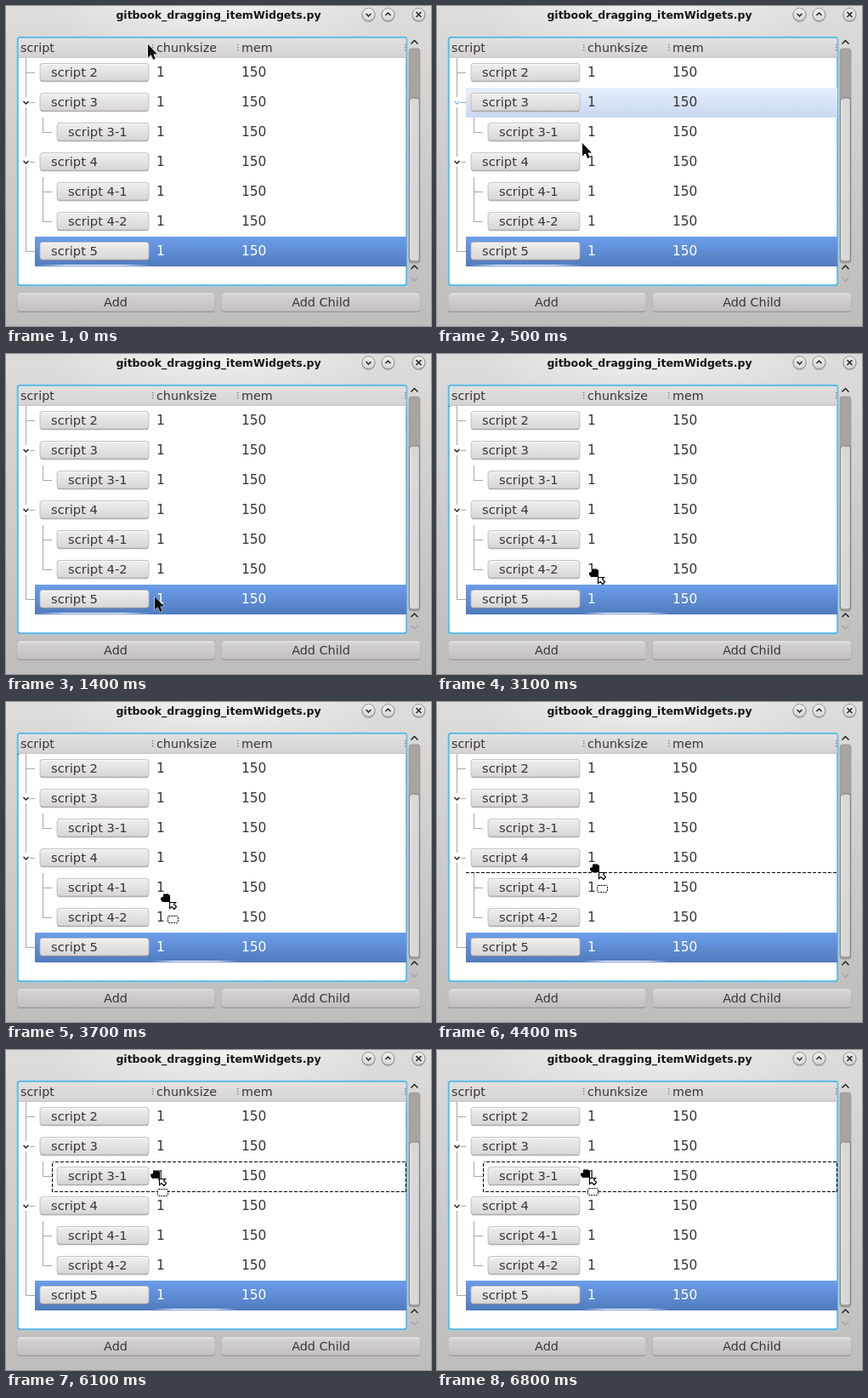
An HTML page that plays this animation: 500x376 px, repeating every 8 s.

```html
<!DOCTYPE html>
<html lang="en">
<head>
<meta charset="utf-8">
<title>Tree drag and drop</title>
<style>
html, body { margin: 0; width: 100%; height: 100%; overflow: hidden; background: #d0cecd; }
svg { display: block; width: 500px; height: 376px; }
text { font: 14.4px "DejaVu Sans", sans-serif; fill: #383533; }
.head { font-size: 14.3px; }
.name { font-size: 14.7px; }
.value { font-size: 15.4px; }
.title { font-size: 12.5px; font-weight: bold; fill: #161514; }
.branch { fill: none; stroke: #a9a7a6; shape-rendering: crispEdges; }
.glyph { fill: none; stroke: #242220; stroke-width: 1.5; }
.dash { fill: none; stroke: #000; stroke-dasharray: 4 2; shape-rendering: crispEdges; }
</style>
</head>
<body>
<svg id="stage" viewBox="0 0 500 376" xmlns="http://www.w3.org/2000/svg">
  <defs>
    <linearGradient id="window" x2="0" y2="1">
      <stop offset="0" stop-color="#dddcdb"/><stop offset=".6" stop-color="#cbc9c8"/><stop offset="1" stop-color="#bfbdbc"/>
    </linearGradient>
    <radialGradient id="shine" gradientUnits="userSpaceOnUse" cx="250" cy="0" r="210" gradientTransform="matrix(1 0 0 .3 0 0)">
      <stop offset="0" stop-color="#fff" stop-opacity=".6"/><stop offset="1" stop-color="#fff" stop-opacity="0"/>
    </radialGradient>
    <linearGradient id="header" x2="0" y2="1">
      <stop offset="0" stop-color="#e2e1e0"/><stop offset="1" stop-color="#d5d3d2"/>
    </linearGradient>
    <linearGradient id="light" x2="0" y2="1">
      <stop offset="0" stop-color="#f0efee"/><stop offset="1" stop-color="#d8d6d5"/>
    </linearGradient>
    <linearGradient id="dull" x2="0" y2="1">
      <stop offset="0" stop-color="#d8d6d5"/><stop offset="1" stop-color="#c3c0be"/>
    </linearGradient>
    <linearGradient id="hover" x2="0" y2="1">
      <stop offset="0" stop-color="#e5eefc"/><stop offset="1" stop-color="#c8d8f1"/>
    </linearGradient>
    <linearGradient id="selected" x2="0" y2="1">
      <stop offset="0" stop-color="#6c9dea"/><stop offset="1" stop-color="#507bbe"/>
    </linearGradient>
    <linearGradient id="focus">
      <stop offset="0" stop-color="#fff" stop-opacity="0"/><stop offset=".25" stop-color="#fff"/>
      <stop offset=".75" stop-color="#fff"/><stop offset="1" stop-color="#fff" stop-opacity="0"/>
    </linearGradient>
  </defs>
</svg>
<script>
const LOOP = 8000, ROW = 35, RIGHT = 471;
const stage = document.getElementById("stage");

function add(tag, attrs, text) {
  const node = document.createElementNS(stage.namespaceURI, tag);
  set(node, attrs);
  if (text) node.textContent = text;
  return stage.appendChild(node);
}
function set(node, attrs) {
  for (const key in attrs) node.setAttribute(key, attrs[key]);
}
const rect = (x, y, width, height, attrs) => add("rect", { x, y, width, height, ...attrs });
const path = (d, attrs) => add("path", { d, ...attrs });
const label = (x, y, text, attrs) => add("text", { x, y, ...attrs }, text);
const show = (node, on) => set(node, { visibility: on ? "visible" : "hidden" });

function button(x, y, width, height, paint) {
  rect(x, y + 1.2, width, height, { rx: 3.5, fill: "#777371", opacity: .65 });
  rect(x, y, width, height, { rx: 3, fill: `url(#${paint})`, stroke: "#bab7b5", "stroke-width": .8 });
  path(`M${x + 3} ${y + 1}h${width - 6}`, { stroke: "#fff", opacity: .6 });
}
function chevron(x, y, up, size = 4, attrs) {
  const h = up ? -size : size;
  return path(`M${x - size} ${y - h / 2}l${size} ${h}l${size} ${-h}`, { class: "glyph", ...attrs });
}

const rows = [
  ["script 2", 0], ["script 3", 0, true], ["script 3-1", 1], ["script 4", 0, true],
  ["script 4-1", 1], ["script 4-2", 1], ["script 5", 0],
].map(([name, depth, open], i) => ({ name, open, left: 34 + 20 * depth, top: 61 + ROW * i }));

// Window and title bar
rect(0, 0, 500, 376, { fill: "url(#window)" });
rect(0, 0, 500, 64, { fill: "url(#shine)" });
label(250, 14.5, "gitbook_dragging_itemWidgets.py", { class: "title", "text-anchor": "middle" });
for (const x of [426.5, 449.5, 485.5]) {
  add("circle", { cx: x, cy: 11, r: 8, fill: "#8d8987", opacity: .6 });
  add("circle", { cx: x, cy: 10, r: 7.5, fill: "url(#light)", stroke: "#8f8c8a", "stroke-width": .9 });
}
chevron(426.5, 10.5, false, 3);
chevron(449.5, 9.5, true, 3);
path("M482.5 7l6 6m0-6l-6 6", { class: "glyph" });

// Tree frame and header
rect(13.5, 37, 458, 291.5, { rx: 3, fill: "#fff", stroke: "#8fd0ee", "stroke-width": 3, opacity: .6 });
rect(14, 37, 457, 291, { rx: 2.5, fill: "#fff", stroke: "#43b1e2", "stroke-width": 1.4 });
rect(15, 38, 455.5, 22, { fill: "url(#header)" });
path("M15 60.5H471", { stroke: "#c6c3c1" });
label(17, 54, "script", { class: "head" });
label(177, 54, "chunksize", { class: "head" });
label(277, 54, "mem", { class: "head" });
for (const x of [172, 272, 469])
  for (const y of [45, 48, 51]) rect(x, y, 1.4, 1.4, { fill: "#858180" });

// Branches
path("M23.5 61V107M23.5 119V177M23.5 189V288.5H34M24 78.5H34M28 113.5H34M28 183.5H34" +
     "M43.5 131V148.5H54M43.5 201V253.5H54M43.5 218.5H54", { class: "branch" });

// Rows
const hover = rect(34, 0, RIGHT - 34, ROW, { fill: "url(#hover)" });
rect(34, 271, RIGHT - 34, ROW, { fill: "url(#selected)" });
const focus = rect(0, 304, 0, 1.2, { fill: "url(#focus)" });
rows.forEach((row, i) => {
  const { left, top } = row;
  const value = { class: "value", style: i === rows.length - 1 ? "fill:#fff" : "" };
  button(left + 6, top + 6.5, 162 - left, 20.5, "light");
  label(left + 19, top + 22, row.name, { class: "name" });
  label(177, top + 22, "1", value);
  label(277, top + 22, "150", value);
  if (row.open) row.arrow = chevron(23.5, top + 17.5, false, 3);
});

// Scroll bar
rect(474, 50, 13, 252, { rx: 3, fill: "#aaa4a1", stroke: "#989290", "stroke-width": .7 });
rect(474.7, 108, 11.6, 192, { rx: 3, fill: "#dad8d7", stroke: "#807c7a" });
path("M476 111V297", { stroke: "#f1f0ef" });
chevron(480.5, 42.5, true);
chevron(480.5, 307, true);
chevron(480.5, 321, false, 4, { style: "stroke:#aaa6a4" });

// Bottom buttons
button(13, 337, 233, 21.5, "dull");
button(253.5, 337, 234, 21.5, "dull");
label(129, 353, "Add", { "text-anchor": "middle" });
label(370.5, 353, "Add Child", { "text-anchor": "middle" });

// Drop indicator and pointers
const drop = path("", { class: "dash" });
const mark = path("M1.5 .5H11.5L12.5 2V7L11.5 8.5H1.5L.5 7V2Z",
  { fill: "#fff", stroke: "#000", "stroke-dasharray": "2 1" });
const arrow = path("M0 0V15.5L3.6 12.2L6.2 18L8.8 17L6.4 11.4H11Z",
  { fill: "#0a0a0a", stroke: "#fff", "stroke-width": 1, "paint-order": "stroke" });
const hand = add("g", {});
const fist = path("M-3 -1V-4L-1 -5L0 -4L2 -5L3 -4L5 -3V5H-4L-6 2V0Z",
  { fill: "#000", stroke: "#fff", "stroke-width": .8, "paint-order": "stroke" });
const tip = path("M4.5 5.5H11.5L9.5 7.5L12.5 10.5L10 13.5L7 10.5L4.5 12.5Z",
  { fill: "#fff", stroke: "#000", "stroke-width": 1.2 });
hand.append(fist, tip);

// Tracks: [time, x, y]
const pointer = [
  [0, 167, 45], [100, 168, 132], [400, 168, 132], [500, 171, 161], [800, 190, 262],
  [1000, 184, 322], [1100, 182, 326], [1300, 176, 287], [1400, 175, 285],
];
const grip = [
  [2700, 178, 284], [3100, 185, 257], [3500, 188, 240], [4400, 186, 195], [5300, 181, 154],
  [5400, 179, 148], [6100, 176, 146], [6300, 176, 146], [6800, 175, 145],
];
const badge = [
  [3200, 190, 273], [3500, 190, 261], [4400, 188, 215], [5300, 183, 175],
  [5400, 182, 171], [6100, 178, 163], [6300, 178, 163], [6800, 177, 162],
];
// Steps: [time, value]
const hovered = [[0, -1], [100, 1], [600, 3], [700, 4], [800, 5], [900, -1]];
const box = i => `M${rows[i].left + .5} ${rows[i].top + .5}H${RIGHT - .5}v${ROW}H${rows[i].left + .5}Z`;
const below = i => `M${rows[i].left} ${rows[i].top + ROW - .5}H${RIGHT}`;
const nowhere = "M14 61.5h1";
const drops = [
  [0, ""], [2700, nowhere], [3200, box(5)], [3600, below(4)], [3700, nowhere], [3800, box(4)],
  [4300, below(3)], [4500, box(3)], [4900, nowhere], [5000, below(2)], [5400, box(2)],
  [6400, nowhere], [6600, box(2)],
];

const stepAt = (steps, t) => steps.findLast(s => s[0] <= t)[1];
function place(node, track, t) {
  const next = track.findIndex(k => k[0] > t);
  const b = track[next < 0 ? track.length - 1 : next];
  const a = next > 0 ? track[next - 1] : b;
  const p = a === b ? 0 : (t - a[0]) / (b[0] - a[0]);
  const [x, y] = [1, 2].map(i => Math.round(a[i] + (b[i] - a[i]) * p));
  set(node, { transform: `translate(${x} ${y})` });
}

function draw(time) {
  const t = Math.floor(time / 100) * 100;
  const row = stepAt(hovered, t);
  show(hover, row >= 0);
  if (row >= 0) set(hover, { x: rows[row].left, y: rows[row].top, width: RIGHT - rows[row].left });
  rows.forEach((r, i) => {
    if (r.arrow) r.arrow.style.stroke = i === row && t >= 500 ? "#6cc8f2" : "";
  });
  set(focus, t < 2400 ? { x: 37, width: 134 } : { x: 172, width: 100 });
  const outline = stepAt(drops, t);
  set(drop, { d: outline, "stroke-dashoffset": outline.endsWith("Z") ? 3 : 0 });
  const dragging = t >= 2700;
  show(arrow, !dragging);
  show(hand, dragging);
  show(mark, t >= 3200);
  place(arrow, pointer, t);
  place(hand, grip, t);
  place(mark, badge, t);
}

const start = performance.now();
function tick() {
  draw((performance.now() - start) % LOOP);
  requestAnimationFrame(tick);
}
draw(0);
requestAnimationFrame(tick);
</script>
</body>
</html>
```
